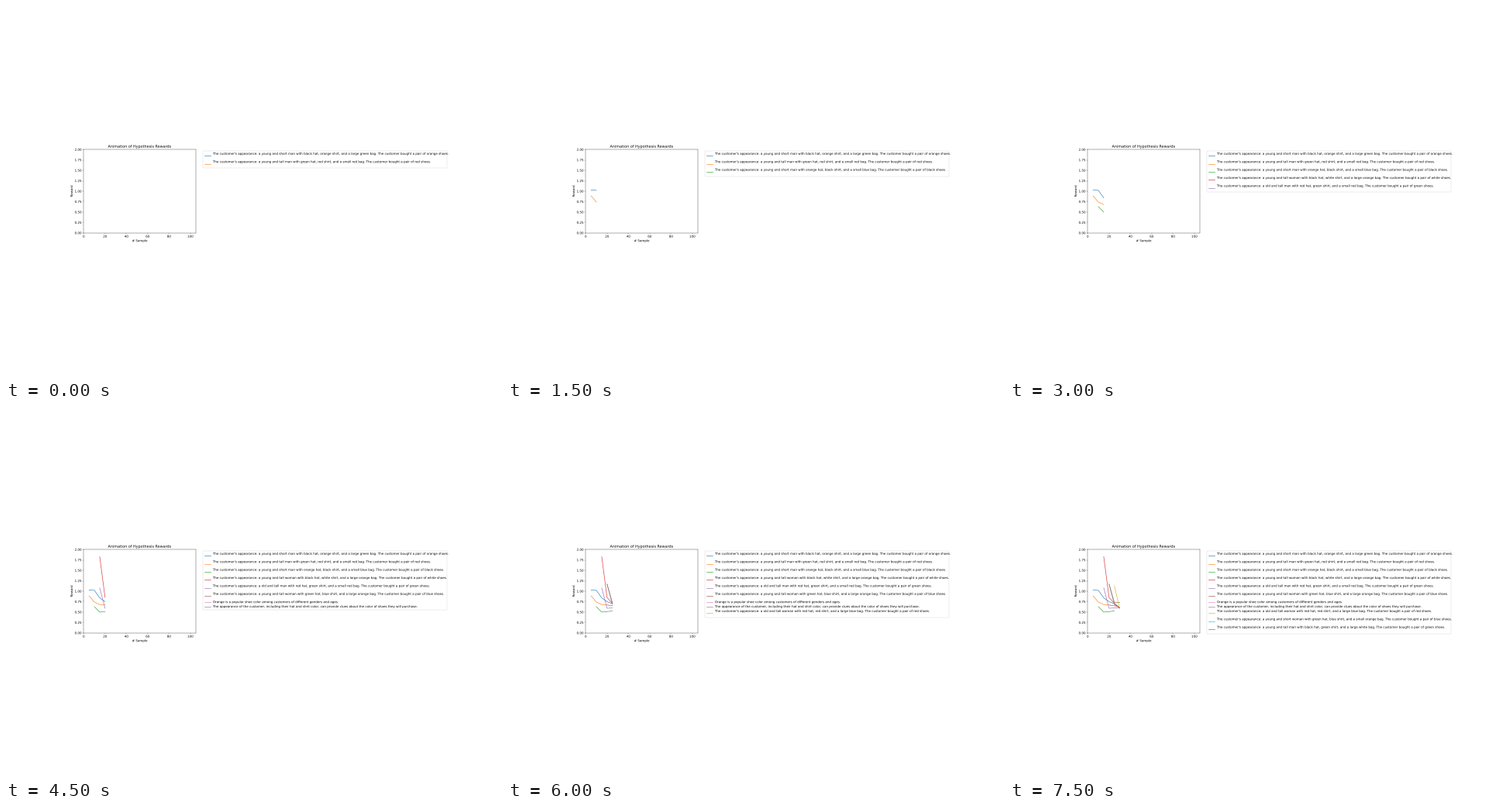
Recreate the animation shown at these times as a matplotlib script. Size 640x480 px, loop 8000 ms.

```python
import matplotlib.pyplot as plt
from matplotlib.animation import FuncAnimation
from matplotlib.patheffects import Normal

W, H = 640, 480
DPI = 29.11
STEP = 5

# Outlined, unhinted text keeps the tiny lettering evenly spaced.
plt.rcParams["path.effects"] = [Normal()]
plt.rcParams["text.hinting"] = "no_hinting"


def customer(person, hat, shirt, bag, shoes):
    return (f"The customer's appearance: a {person} with {hat} hat, {shirt} shirt, "
            f"and a {bag} bag. The customer bought a pair of {shoes} shoes.\n")


# label, stage at which it joins the legend, first sample, rewards
HYPOTHESES = [
    (customer("young and short man", "black", "orange", "large green", "orange"),
     0, 5, [1.03, 1.02, 0.84, 0.75, 0.70, 0.60]),
    (customer("young and tall man", "green", "red", "small red", "red"),
     0, 5, [0.89, 0.74, 0.68, 0.67, 0.65, 0.62]),
    (customer("young and short man", "orange", "black", "small blue", "black"),
     1, 10, [0.63, 0.50, 0.51, 0.53]),
    (customer("young and tall woman", "black", "white", "large orange", "white"),
     2, 15, [1.83, 0.85, 0.71, 0.60]),
    (customer("old and tall man", "red", "green", "small red", "green"),
     2, 15, [1.08, 0.59, 0.60, 0.60]),
    (customer("young and tall woman", "green", "blue", "large orange", "blue"),
     3, 20, [1.17, 0.73, 0.73]),
    ("Orange is a popular shoe color among customers of different genders and ages.",
     3, 20, [0.67, 0.65, 0.62]),
    ("The appearance of the customer, including their hat and shirt color, "
     "can provide clues about the color of shoes they will purchase.",
     3, 20, [1.17, 0.68, 0.60]),
    (customer("old and tall woman", "red", "red", "large blue", "red"),
     4, 25, [1.13, 0.58]),
    (customer("young and short woman", "green", "blue", "small orange", "blue"),
     5, 30, [0.60]),
    (customer("young and tall man", "black", "green", "large white", "green"),
     5, 30, [0.60]),
]

fig = plt.figure(figsize=(W / DPI, H / DPI), dpi=DPI)
ax = fig.add_axes([100.3 / W, 1 - 292.8 / H, 144.4 / W, 107.6 / H])


def draw(frame):
    stage = frame // 3
    last = STEP * (stage + 1)
    ax.clear()
    for label, joins, first, rewards in HYPOTHESES:
        if joins <= stage:
            shown = rewards[:(last - first) // STEP + 1]
            samples = [first + STEP * i for i in range(len(shown))]
            ax.plot(samples, shown, label=label)
    ax.set(xlim=(0, 105), ylim=(0, 2), xlabel="# Sample", ylabel="Reward",
           title="Animation of Hypothesis Rewards")
    ax.legend(bbox_to_anchor=(1.05, 1), loc="upper left")


anim = FuncAnimation(fig, draw, frames=16, interval=500, init_func=lambda: None,
                     repeat=True, repeat_delay=0)
plt.show()
```
